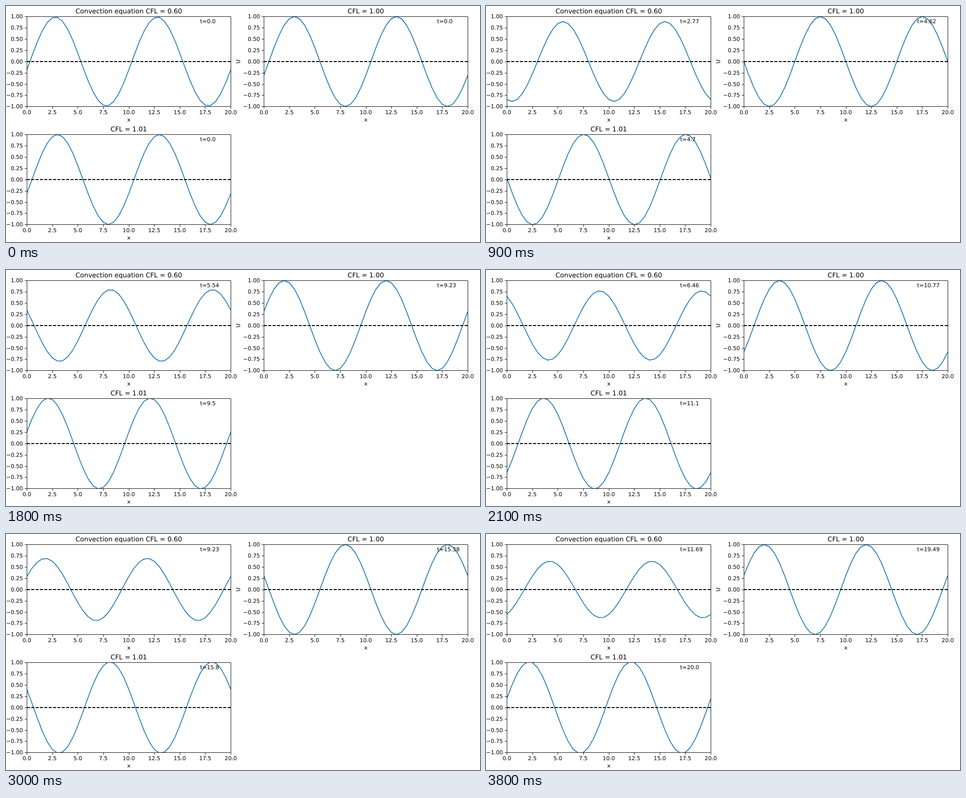
Write an HTML page that moves like this. It is 960 px wide and 480 px high and loops after 3900 ms.

```html
<!DOCTYPE html>
<html lang="en">
<head>
<meta charset="utf-8">
<title>Convection equation</title>
<style>
  html, body { margin: 0; width: 100%; height: 100%; overflow: hidden; background: #fff; }
  svg { display: block; width: 960px; height: 480px; }
  text { font: 11.11px "DejaVu Sans", sans-serif; text-rendering: geometricPrecision; }
  .title { font-size: 13.33px; }
  .mid { text-anchor: middle; }
  .end { text-anchor: end; }
  .axis { fill: none; stroke: #000; stroke-width: .9; }
  .zero { fill: none; stroke: #000; stroke-width: 2; stroke-dasharray: 6.17 2.67; }
  .wave { fill: none; stroke: #1f77b4; stroke-width: 1.67; stroke-linejoin: round; }
</style>
</head>
<body>
<svg id="stage" viewBox="0 0 960 480"></svg>
<script>
const STEP = 100, STEPS = 39, W = 413, H = 183;
const DX = 0.5, THETA = 2 * Math.PI * DX / 10;
const stage = document.getElementById('stage');

const plots = [
  { x: 42, y: 21, cfl: 0.6, title: 'Convection equation CFL = 0.60', dt: 12 / 39, digits: 2 },
  { x: 522, y: 21, cfl: 1, title: 'CFL = 1.00', dt: 20 / 39, digits: 2, yLabel: 'U' },
  { x: 42, y: 261, cfl: 1.01, title: 'CFL = 1.01', dt: 20 / 38, digits: 1 }
];

function add(parent, tag, attrs, content) {
  const el = document.createElementNS('http://www.w3.org/2000/svg', tag);
  for (const key in attrs) el.setAttribute(key, attrs[key]);
  if (content) el.textContent = content;
  parent.appendChild(el);
  return el;
}

function build(p, i) {
  const g = add(stage, 'g', { transform: `translate(${p.x} ${p.y})` });
  const clip = add(g, 'clipPath', { id: 'clip' + i });
  add(clip, 'rect', { width: W + .3, height: H + .3, x: .2, y: .2 });
  const inner = add(g, 'g', { 'clip-path': `url(#clip${i})` });
  p.wave = add(inner, 'path', { class: 'wave' });
  add(inner, 'path', { class: 'zero', d: `M.2 92H${W + .2}` });

  let d = `M.5 .5H${W + .5}V${H + .5}H.5Z`;
  for (let k = 0; k <= 8; k++) {
    const x = W * k / 8, y = .3 + H * k / 8;
    d += `M${Math.round(x) + .5} ${H + .5}v4.4M.5 ${Math.round(y) + .5}h-4.4`;
    add(g, 'text', { class: 'mid', x: x + .2, y: H + 16.3 }, (k * 2.5).toFixed(1));
    const value = (1 - k / 4).toFixed(2).replace('-', '\u2212');
    add(g, 'text', { class: 'end', x: -7.6, y: y + 4 }, value);
  }
  add(g, 'path', { class: 'axis', d });

  add(g, 'text', { class: 'title mid', x: W / 2 + .2, y: -6.5 }, p.title);
  add(g, 'text', { class: 'mid', x: W / 2 + .2, y: 214 }, 'x');
  if (p.yLabel) add(g, 'text', { class: 'mid', transform: 'translate(-48 92) rotate(-90)' }, p.yLabel);
  p.clock = add(g, 'text', { x: W * .85 + .2, y: 14 });
}

// Upwind scheme on a periodic grid: every step scales and shifts the sine.
function draw(p, step) {
  const re = 1 - p.cfl * (1 - Math.cos(THETA));
  const im = p.cfl * Math.sin(THETA);
  const amp = Math.hypot(re, im) ** (step + 1);
  const phase = Math.atan2(im, re) * (step + 1);
  const points = [];
  for (let j = 0; j <= 40; j++) {
    const u = amp * Math.sin(j * THETA - phase);
    points.push((.2 + W * j / 40).toFixed(2) + ' ' + (91.9 - H / 2 * u).toFixed(2));
  }
  p.wave.setAttribute('d', 'M' + points.join('L'));

  const t = Number((step * p.dt).toFixed(p.digits));
  p.clock.textContent = 't=' + (Number.isInteger(t) ? t.toFixed(1) : t);
}

let shown = -1;
const start = performance.now();
function tick() {
  const step = Math.floor(Math.max(0, performance.now() - start) / STEP) % STEPS;
  if (step !== shown) {
    shown = step;
    plots.forEach(p => draw(p, step));
  }
  requestAnimationFrame(tick);
}

plots.forEach(build);
tick();
</script>
</body>
</html>
```
